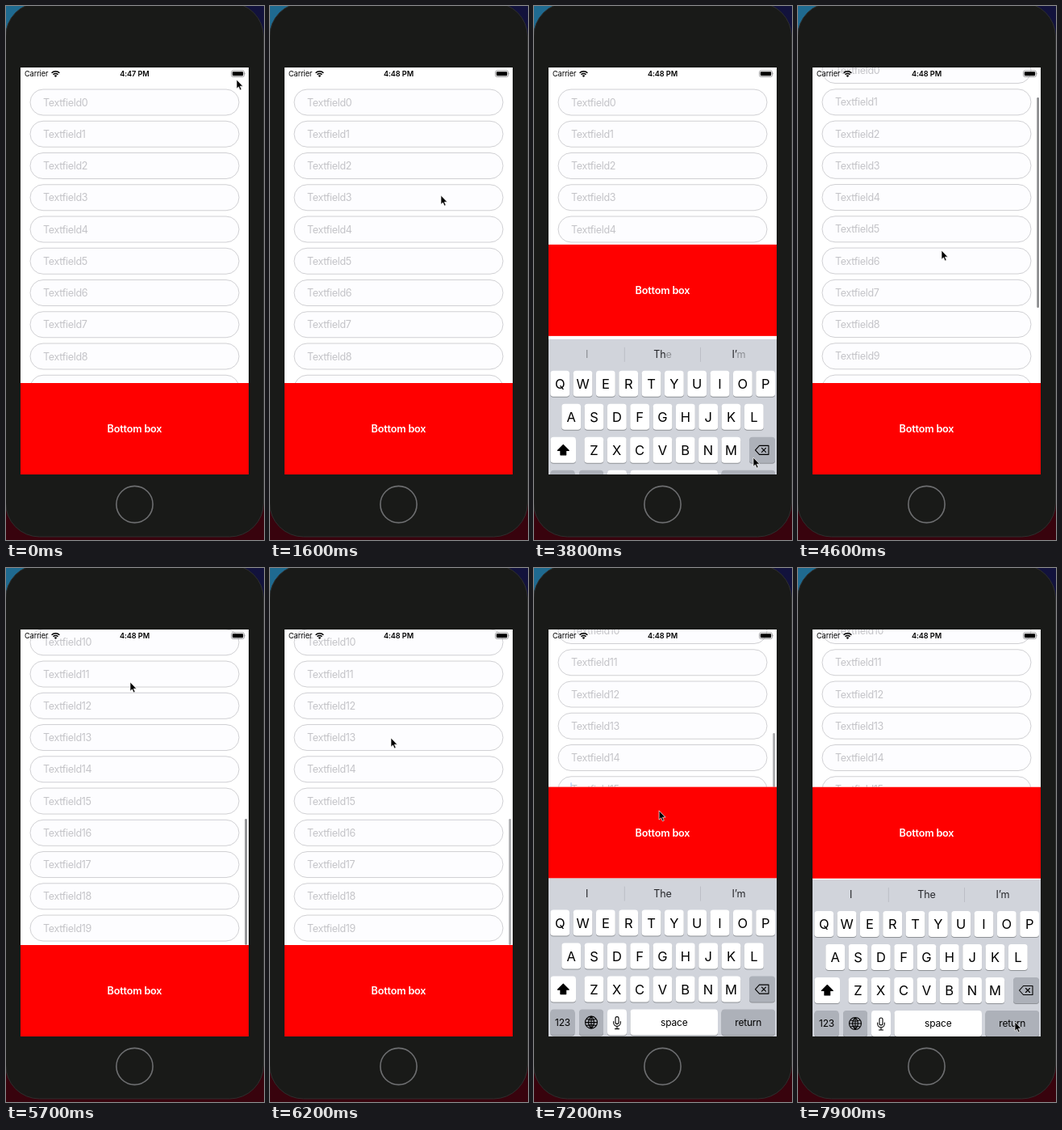
Recreate the animation shown at these times as an HTML page. Size 320 by 660 pixels, loop 8000 ms.

```html
<!DOCTYPE html>
<html lang="en">
<head>
<meta charset="utf-8">
<title>Form with keyboard</title>
<style>
  html, body { margin: 0; width: 100%; height: 100%; overflow: hidden; background: #12123c; }
  svg { display: block; width: 100vw; height: 100vh; }
  text { font-family: Inter, Roboto, "Liberation Sans", sans-serif; fill: #000; }
  .mid { text-anchor: middle; }
  .field rect { fill: #fdfdff; stroke: #cbcbcf; stroke-width: .9; }
  .field text { font-size: 12.6px; letter-spacing: -.35px; fill: #c4c4c8; }
  .status { font-size: 9.2px; letter-spacing: -.1px; }
  .box { font-size: 12.7px; font-weight: 600; letter-spacing: -.2px; fill: #fff; }
  .letter { font-size: 16.5px; }
  .label { font-size: 12px; letter-spacing: -.2px; }
  .hint { font-size: 12.6px; letter-spacing: -.2px; fill: #26272b; }
  .line { fill: none; stroke: #000; stroke-width: 1.1; stroke-linecap: round; stroke-linejoin: round; }
</style>
</head>
<body>
<svg viewBox="0 0 320 660" preserveAspectRatio="none">
  <defs>
    <clipPath id="screen"><rect x="18" y="76" width="283" height="503"/></clipPath>
  </defs>

  <rect width="320" height="660" fill="#12123c"/>
  <rect width="60" height="60" fill="#1f6a90"/>
  <rect y="600" width="320" height="60" fill="#38030d"/>
  <rect x="-.5" y="-4" width="320" height="660" rx="42" fill="#191a18" stroke="#2e2f2e"/>
  <circle cx="159.5" cy="616" r="22.6" fill="none" stroke="#6d6e70" stroke-width="1.6"/>

  <g clip-path="url(#screen)">
    <rect x="18" y="76" width="283" height="503" fill="#fff"/>
    <g id="list"></g>
    <rect id="bar" x="296.3" width="2.6" rx="1.3" fill="#88898c"/>

    <g class="status">
      <text x="23" y="87.2">Carrier</text>
      <text id="clock" class="mid" x="159.5" y="87.3" font-weight="600"></text>
      <path class="line" style="stroke-width:1.5;stroke-linecap:butt"
        d="M56.6 82.8a6.8 6.8 0 0 1 9.8 0M58.5 84.8a4.2 4.2 0 0 1 6 0"/>
      <path d="M61.5 88l-1.7-1.8a2.4 2.4 0 0 1 3.4 0z"/>
      <rect x="279.5" y="79.9" width="16" height="7.6" rx="2" fill="none" stroke="#8d8d90" stroke-width=".8"/>
      <rect x="280.8" y="81.2" width="13.4" height="5" rx="1"/>
      <path d="M296.4 82.3q1.3 1.3 0 2.8z" fill="#8d8d90"/>
    </g>

    <g id="box">
      <rect x="18" width="283" height="330" fill="#fff"/>
      <rect x="18" width="283" height="113" fill="#f00"/>
      <text class="box mid" x="159.5" y="61">Bottom box</text>
    </g>

    <g id="keys">
      <rect x="18" width="283" height="200" fill="#d1d4db"/>
      <path d="M112.3 10v18M206.5 10v18" stroke="#b9bcc3" stroke-width=".9"/>
      <text class="hint mid" x="65.5" y="23.5"><tspan class="tail">I</tspan></text>
      <text class="hint mid" x="159.5" y="23.5">Th<tspan class="tail">e</tspan></text>
      <text class="hint mid" x="254" y="23.5">I’<tspan class="tail">m</tspan></text>
    </g>
  </g>

  <path id="cursor" d="M0 0v11.2l2.5-2.3 1.8 4.1 1.9-.8-1.8-4h3.5z" stroke="#fff" stroke-width=".7"/>
</svg>

<script>
const LOOP = 8000, STEP = 100, PITCH = 39.25, KB_TRAVEL = 196;
const GREY = '#adb1b9', WHITE = '#fff';
const $ = id => document.getElementById(id);

function add(parent, name, attrs, text) {
  const el = document.createElementNS('http://www.w3.org/2000/svg', name);
  for (const key in attrs) el.setAttribute(key, attrs[key]);
  if (text) el.textContent = text;
  parent.append(el);
  return el;
}

// Text fields
for (let i = 0; i < 20; i++) {
  const row = add($('list'), 'g', { class: 'field', transform: `translate(0 ${119 + i * PITCH})` });
  add(row, 'rect', { x: 30, y: -16, width: 259, height: 32, rx: 16 });
  add(row, 'text', { x: 46, y: 4.6 }, 'Textfield' + i);
}
const caret = add($('list'), 'rect', { x: 45.2, width: 1.7, height: 17, fill: '#3478d8' });

// Keyboard
function key(x, y, w, fill, text, cls = 'letter') {
  add($('keys'), 'rect', { x, y: y + 1, width: w, height: 32, rx: 3.8, fill: '#8e9196' });
  const cap = add($('keys'), 'rect', { x, y, width: w, height: 32, rx: 3.8, fill });
  if (text) add($('keys'), 'text', { class: cls + ' mid', x: x + w / 2, y: y + (cls === 'letter' ? 22 : 20.3) }, text);
  return cap;
}
function letters(chars, first, y) {
  [...chars].forEach((c, i) => key(first + i * 28.33 - 11.9, y, 23.8, WHITE, c));
}
const icon = (d, attrs) => add($('keys'), 'path', { d, class: 'line', ...attrs });

letters('QWERTYUIOP', 32.2, 39);
letters('ASDFGHJKL', 46.2, 80);
letters('ZXCVBNM', 74.4, 121);
key(20.5, 121, 31.5, WHITE);
key(267, 121, 32, GREY);
key(20.5, 162, 30, GREY, '123', 'label');
key(56, 162, 30, GREY);
key(91, 162, 24, WHITE);
key(119.5, 162, 108.5, WHITE, 'space', 'label');
const returnKey = key(232.5, 162, 66.5, GREY, 'return', 'label');

icon('M36.3 130.5l7 7h-3.6v5.5h-6.8v-5.5h-3.6z', { style: 'fill:#000' });
icon('M274.5 137l5-5.5h11.5v11h-11.5zM282.5 134.5l5 5M287.5 134.5l-5 5');
icon('M63.5 178a7.5 7.5 0 1 0 15 0a7.5 7.5 0 1 0 -15 0h15M71 170.5v15M71 170.5q-7 7.5 0 15q7 -7.5 0 -15M65.3 174q5.7 2 11.4 0M65.3 182q5.7 -2 11.4 0');
icon('M101 173a2 2 0 0 1 4 0v5a2 2 0 0 1 -4 0zM98.7 177v1.5a4.3 4.3 0 0 0 8.6 0v-1.5M103 183v3M100.5 186h5');

// Motion
const clamp = v => Math.min(1, Math.max(0, v));
const tails = document.querySelectorAll('.tail');

// Smooth step from 0 to 1
function ramp(t, start, length) {
  const p = clamp((t - start) / length);
  return p * p * (3 - 2 * p);
}

// Critically damped spring from 0 to 1
function spring(ms) {
  const u = Math.max(0, ms) / 40;
  return 1 - (1 + u) * Math.exp(-u);
}

// Times when a field is focused and then released
const sessions = [
  { row: 3, open: 2379, close: 3773 },
  { row: 15, open: 6879, close: 7894 }
];
const BOX_LAG = 2.4;
const rise = t => sessions.reduce((sum, s) => sum + spring(t - s.open) - spring(t - s.close), 0);

// Each glide: start, length, end point
const glides = [
  [100, 500, 228, 213], [1300, 400, 209, 238], [2700, 800, 272, 558],
  [4100, 500, 178, 302], [4600, 300, 168, 190], [5000, 300, 160, 380],
  [5300, 400, 154, 141], [5900, 600, 146, 279], [7100, 600, 269, 561]
];
function pointer(t) {
  let x = 286, y = 91;
  for (const [start, length, endX, endY] of glides) {
    const p = ramp(t, start, length);
    x += (endX - x) * p;
    y += (endY - y) * p;
  }
  return [x, y];
}

// Two swipes, then a nudge as the keyboard opens
const scroll = t => 225 * ramp(t, 4440, 600) + 194.7 * ramp(t, 5250, 450) + 14.3 * ramp(t, 6850, 50);

const move = (id, x, y) => $(id).setAttribute('transform', `translate(${x} ${y})`);

function drawBar(t, offset) {
  const nudged = t > 6800;
  const top = nudged ? 204 : 92.5 + .518 * offset;
  const bottom = nudged ? 331 : 363.3 + .2445 * offset;
  $('bar').setAttribute('y', top);
  $('bar').setAttribute('height', bottom - top);
  $('bar').setAttribute('opacity',
    ramp(t, 4450, 100) - ramp(t, 6100, 300) + ramp(t, 6800, 100) - ramp(t, 7100, 300));
}

function draw(t) {
  const offset = scroll(t), open = rise(t);
  move('cursor', ...pointer(t));
  move('list', 0, -offset);
  move('box', 0, 466 - rise(t - BOX_LAG) * KB_TRAVEL);
  move('keys', 0, 579 - open * KB_TRAVEL);
  drawBar(t, offset);

  const active = sessions.find(s => t >= s.open && t < s.close);
  caret.setAttribute('opacity', active ? clamp(.8 + 1.2 * Math.cos((t - active.open) * 2 * Math.PI / 1000)) : 0);
  if (active) caret.setAttribute('y', 119 + active.row * PITCH - 8.5);

  returnKey.setAttribute('fill', active && active.close - t < 100 ? WHITE : GREY);
  tails.forEach(el => el.setAttribute('fill-opacity', open > .95 ? 1 : .4));
  $('clock').textContent = t < 400 ? '4:47 PM' : '4:48 PM';
}

const start = performance.now();
function tick() {
  const t = (performance.now() - start) % LOOP;
  draw(Math.floor(t / STEP) * STEP);
  requestAnimationFrame(tick);
}
tick();
</script>
</body>
</html>
```
